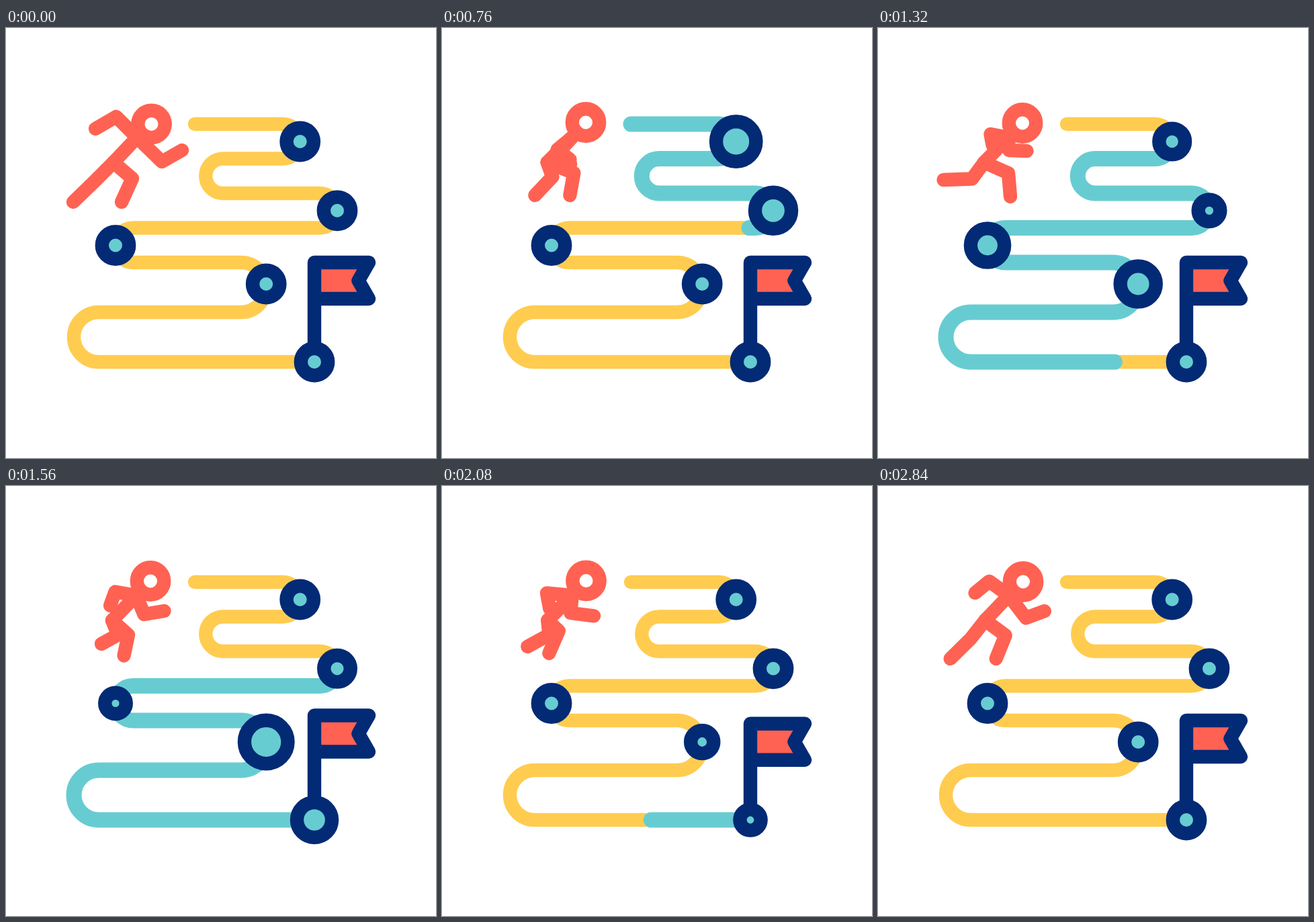
An HTML page with a canvas for the animation above (2.88 s loop, 640 by 640 pixels).

```html
<!DOCTYPE html>
<html lang="en">
<head>
<meta charset="utf-8">
<title>Runner route</title>
<style>
  html, body { margin: 0; width: 100%; height: 100%; overflow: hidden; background: #fff; }
  canvas { display: block; width: 640px; height: 640px; }
</style>
</head>
<body>
<canvas id="stage"></canvas>
<script>
const LOOP = 2880, STEP = 40, STRIDE = 960;
const YELLOW = '#ffcc50', TEAL = '#67ccd1', NAVY = '#032a75', RED = '#ff6252';
const LINE = 20.4;

const canvas = document.getElementById('stage');
const ratio = window.devicePixelRatio || 1;
canvas.width = canvas.height = 640 * ratio;
const ctx = canvas.getContext('2d');
ctx.scale(ratio, ratio);
ctx.lineCap = ctx.lineJoin = 'round';

const mix = (a, b, u) => a + (b - a) * u;
const smooth = u => u * u * (3 - 2 * u);

// Strong ease in and out: cubic-bezier(2/3, 0, 1/3, 1)
function ease(x) {
  if (x <= 0) return 0;
  if (x >= 1) return 1;
  let low = 0, high = 1;
  for (let i = 0; i < 30; i++) {
    const s = (low + high) / 2;
    if (2 * s - 3 * s * s + 2 * s * s * s < x) low = s; else high = s;
  }
  return smooth(low);
}

// Smooth interpolation through [time, value] pairs
function track(keys, t) {
  if (t <= keys[0][0]) return keys[0][1];
  for (let i = 1; i < keys.length; i++) {
    const [t0, v0] = keys[i - 1], [t1, v1] = keys[i];
    if (t < t1) return mix(v0, v1, smooth((t - t0) / (t1 - t0)));
  }
  return keys[keys.length - 1][1];
}

// Route: straight runs joined by half circles
const ROUTE_LENGTH = 1892;
const route = new Path2D();
const turn = (x, y, r, side) =>
  route.arc(x, y, r, -Math.PI / 2, Math.PI / 2, side < 0);
route.moveTo(281, 143);
turn(412, 168.75, 25.75, 1);
turn(323, 220.25, 25.75, -1);
turn(467, 271.75, 25.75, 1);
turn(189, 323.25, 25.75, -1);
turn(350, 386, 37, 1);
turn(138, 460, 37, -1);
route.lineTo(459, 497);

const flag = new Path2D('M459 482V349H540L524.5 376L540 403H459');

// Checkpoints: position, pulse start, swing time, settle time
const dots = [
  { x: 437.7, y: 169, start: 325, swing: 340, settle: 430 },
  { x: 493, y: 271.8, start: 600, swing: 305, settle: 430 },
  { x: 163, y: 323.5, start: 825, swing: 337, settle: 520 },
  { x: 387.2, y: 381, start: 1128, swing: 385, settle: 480 },
  { x: 459, y: 497, start: 1400, swing: 340, settle: 500 }
];
const flagKeys = [[1400, 0], [1740, -16.5], [2180, 8], [2830, 0]];

// Stride poses at equal intervals, each joint as x, y
const poses = [
  { head: [216.5, 143], shoulder: [195, 163], hip: [160, 200],
    armA: [164, 132, 133, 150], armB: [232, 199, 262, 182],
    legA: [131, 229, 100, 259], legB: [188, 224, 172, 259] },
  { head: [213.5, 140], shoulder: [193, 163], hip: [156, 200],
    armA: [152, 173, 174, 199], armB: [171, 184, 208, 199],
    legA: [195, 209, 189, 244], legB: [145, 220, 105, 229] },
  { head: [216.5, 143], shoulder: [195, 163], hip: [160, 200],
    armA: [238, 191, 269, 167], armB: [164, 132, 133, 149],
    legA: [193, 223, 205, 258], legB: [135, 229, 90, 223] },
  { head: [213.5, 140], shoulder: [193, 163], hip: [156, 200],
    armA: [173, 191, 202, 205], armB: [161, 183, 177, 207],
    legA: [171, 220, 146, 247], legB: [198, 214, 194, 247] }
];

function stroke(path, color, width) {
  ctx.strokeStyle = color;
  ctx.lineWidth = width;
  ctx.stroke(path);
}

function polyline(...coords) {
  const path = new Path2D();
  for (let i = 0; i < coords.length; i += 2) path.lineTo(coords[i], coords[i + 1]);
  stroke(path, RED, LINE);
}

function ring(x, y, r, color, fill) {
  const path = new Path2D();
  path.arc(x, y, r, 0, 2 * Math.PI);
  ctx.fillStyle = fill;
  ctx.fill(path);
  stroke(path, color, LINE);
}

function drawRoute(t) {
  stroke(route, YELLOW, LINE);
  const head = ROUTE_LENGTH * ease((t - 15) / 1704);
  const tail = ROUTE_LENGTH * ease((t - 830) / 1704);
  if (head - tail < 0.5) return;
  ctx.setLineDash([head - tail, 2 * ROUTE_LENGTH]);
  ctx.lineDashOffset = -tail;
  stroke(route, TEAL, 23);
  ctx.setLineDash([]);
}

function drawFlag(t) {
  ctx.save();
  ctx.translate(0, track(flagKeys, t));
  ctx.fillStyle = RED;
  ctx.fill(new Path2D('M459 349H540L524.5 376L540 403H459Z'));
  stroke(flag, NAVY, LINE);
  ctx.restore();
}

function drawDot({ x, y, start, swing, settle }, t) {
  const trough = start + 2 * swing;
  const r = track([[start, 20.2], [start + swing, 33], [trough, 15.6],
    [trough + settle, 20.2]], t);
  ring(x, y, r, NAVY, TEAL);
}

function drawRunner(t) {
  const phase = (t % STRIDE) / STRIDE * poses.length;
  const index = Math.floor(phase);
  const from = poses[index], to = poses[(index + 1) % poses.length];
  const joint = name => from[name].map((v, i) => mix(v, to[name][i], phase - index));
  const shoulder = joint('shoulder'), hip = joint('hip');
  polyline(...shoulder, ...hip);
  for (const arm of ['armA', 'armB']) polyline(...shoulder, ...joint(arm));
  for (const leg of ['legA', 'legB']) polyline(...hip, ...joint(leg));
  ring(...joint('head'), 20.2, RED, '#fff');
}

function frame(now) {
  const t = Math.floor((now % LOOP) / STEP + 0.01) * STEP % LOOP;
  ctx.fillStyle = '#fff';
  ctx.fillRect(0, 0, 640, 640);
  drawRoute(t);
  drawFlag(t);
  for (const dot of dots) drawDot(dot, t);
  drawRunner(t);
  requestAnimationFrame(() => frame(performance.now() - began));
}

const began = performance.now();
frame(0);
</script>
</body>
</html>
```
